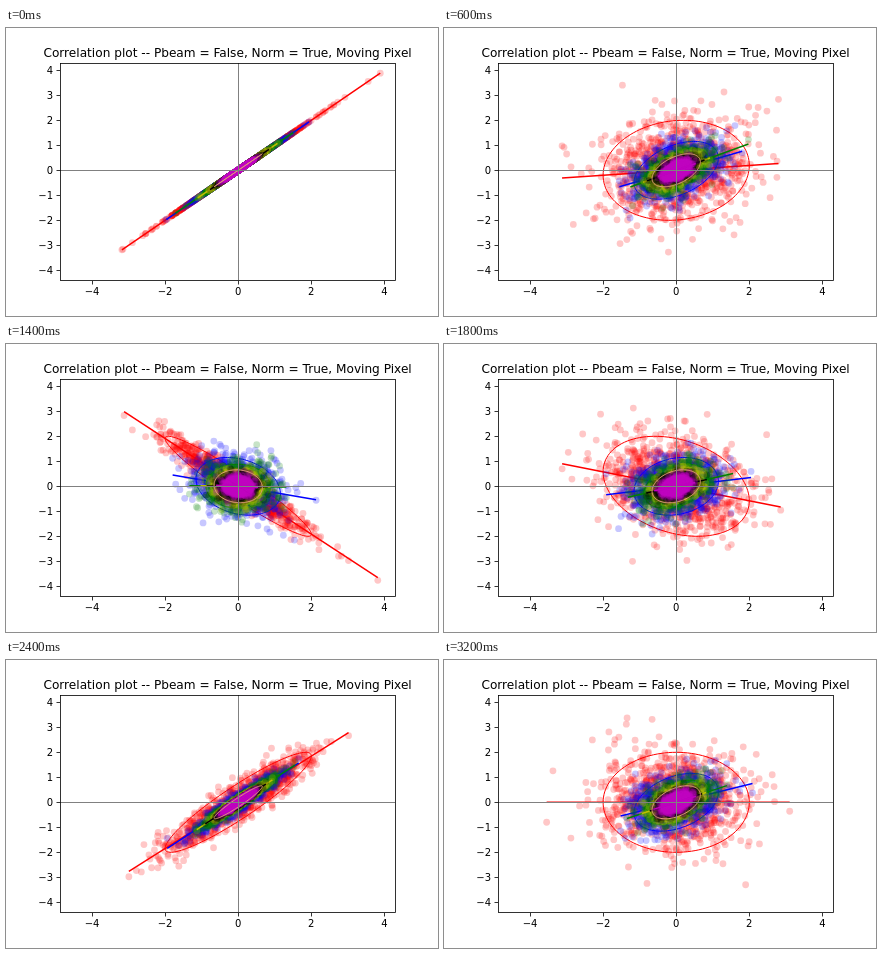
These frames come from a looping animation (432x288 px, 3400 ms). An HTML page with a canvas:

```html
<!DOCTYPE html>
<html lang="en">
<head>
<meta charset="utf-8">
<title>Correlation plot</title>
<style>
  html, body { margin: 0; width: 100%; height: 100%; overflow: hidden; background: #fff; }
  canvas, svg { position: absolute; left: 0; top: 0; width: 432px; height: 288px; }
  text { font: 10px "DejaVu Sans", sans-serif; fill: #000; }
  .title { font-size: 12.13px; }
</style>
</head>
<body>
<canvas id="cloud" width="432" height="288"></canvas>
<svg id="axes" viewBox="0 0 432 288">
  <path d="M54 142.5H389M232.5 35V252" stroke="#808080" shape-rendering="crispEdges"/>
  <rect x="54.5" y="35.5" width="335" height="217" fill="none" stroke="#000" stroke-width=".8"/>
  <text class="title" x="221.6" y="29" text-anchor="middle">Correlation plot -- Pbeam = False, Norm = True, Moving Pixel</text>
</svg>
<script>
const STEP = 200, STEPS = 17, COUNT = 1000;
const ORIGIN = { x: 232.2, y: 142.3 }, UNIT = { x: 36.55, y: 25 };
const px = x => ORIGIN.x + x * UNIT.x;
const py = y => ORIGIN.y - y * UNIT.y;

// Averaging more pixels shrinks the spread; the shared part never decorrelates.
const series = [
  { color: '#ff0000', sd: 1, shared: 0 },
  { color: '#0000ff', sd: 0.577, shared: 0.36 },
  { color: '#008000', sd: 0.44, shared: 0.48 },
  { color: '#bfbf00', sd: 0.3, shared: 0.48 },
  { color: '#000000', sd: 0.24, shared: 0.48 },
  { color: '#bf00bf', sd: 0.18, shared: 0.45 }
];
const halo = { color: '#e29a78', sd: 0.33, shared: 0.45 };

const ctx = document.getElementById('cloud').getContext('2d');

function randomFrom(seed) {
  return () => {
    seed = (seed + 0x6d2b79f5) | 0;
    let t = Math.imul(seed ^ (seed >>> 15), 1 | seed);
    t = (t + Math.imul(t ^ (t >>> 7), 61 | t)) ^ t;
    return ((t ^ (t >>> 14)) >>> 0) / 4294967296;
  };
}

// Maps a point of the unit circle plane to a correlated pair on the stage.
function place(s, rho, r, angle) {
  const u = s.sd * r * Math.cos(angle), v = s.sd * r * Math.sin(angle);
  return [px(u), py(rho * u + Math.sqrt(Math.max(0, 1 - rho * rho)) * v)];
}

// Returns the horizontal extent of the cloud on the stage.
function drawPoints(s, rho, seed) {
  const rand = randomFrom(seed);
  let left = Infinity, right = -Infinity;
  ctx.globalAlpha = 0.22;
  ctx.fillStyle = s.color;
  for (let i = 0; i < COUNT; i++) {
    const r = Math.sqrt(-2 * Math.log(1 - rand()));
    const [x, y] = place(s, rho, r, 2 * Math.PI * rand());
    left = Math.min(left, x);
    right = Math.max(right, x);
    ctx.beginPath();
    ctx.arc(x, y, 3.4, 0, 2 * Math.PI);
    ctx.fill();
  }
  return [left, right];
}

function strokeLine(color, width, points, closed) {
  ctx.globalAlpha = 1;
  ctx.lineWidth = width;
  ctx.strokeStyle = color;
  ctx.beginPath();
  points.forEach(p => ctx.lineTo(p[0], p[1]));
  if (closed) ctx.closePath();
  ctx.stroke();
}

// Two-sigma covariance ellipse.
function drawEllipse(s, rho) {
  const points = Array.from({ length: 120 }, (_, i) => place(s, rho, 2, i * Math.PI / 60));
  strokeLine(s.color, 1, points, true);
}

function drawFit(s, rho, extent) {
  strokeLine(s.color, 1.5, extent.map(x => [x, py(rho * (x - ORIGIN.x) / UNIT.x)]));
}

function draw(step) {
  const wave = Math.cos(2.5 * Math.PI * step / (STEPS - 1));
  const rhoOf = s => s.shared + (1 - s.shared) * wave;
  ctx.clearRect(0, 0, 432, 288);
  series.forEach((s, i) => {
    const rho = rhoOf(s);
    const extent = drawPoints(s, rho, 7919 * step + 101 * i + 5);
    drawEllipse(s, rho);
    drawFit(s, rho, extent);
  });
  drawEllipse(halo, rhoOf(halo));
}

function addAxis() {
  const svg = document.getElementById('axes');
  const add = (name, attrs, content = '') => {
    const el = document.createElementNS('http://www.w3.org/2000/svg', name);
    for (const key in attrs) el.setAttribute(key, attrs[key]);
    el.textContent = content;
    svg.append(el);
  };
  const mark = d => add('path', { d, stroke: '#000', 'stroke-width': 0.8 });
  const snap = v => Math.floor(v) + 0.5;
  for (let v = -4; v <= 4; v++) {
    const label = String(v).replace('-', '\u2212');
    const x = px(v), y = py(v);
    mark(`M54 ${snap(y)}h-3.5`);
    add('text', { x: 47, y: y + 3.8, 'text-anchor': 'end' }, label);
    if (v % 2) continue;
    mark(`M${snap(x)} 253v3.5`);
    add('text', { x, y: 266.6, 'text-anchor': 'middle' }, label);
  }
}

const start = performance.now();
let shown = -1;

function tick() {
  const time = (performance.now() - start) % (STEP * STEPS);
  const step = Math.floor(time / STEP);
  if (step !== shown) draw(shown = step);
  requestAnimationFrame(tick);
}

addAxis();
tick();
</script>
</body>
</html>
```
